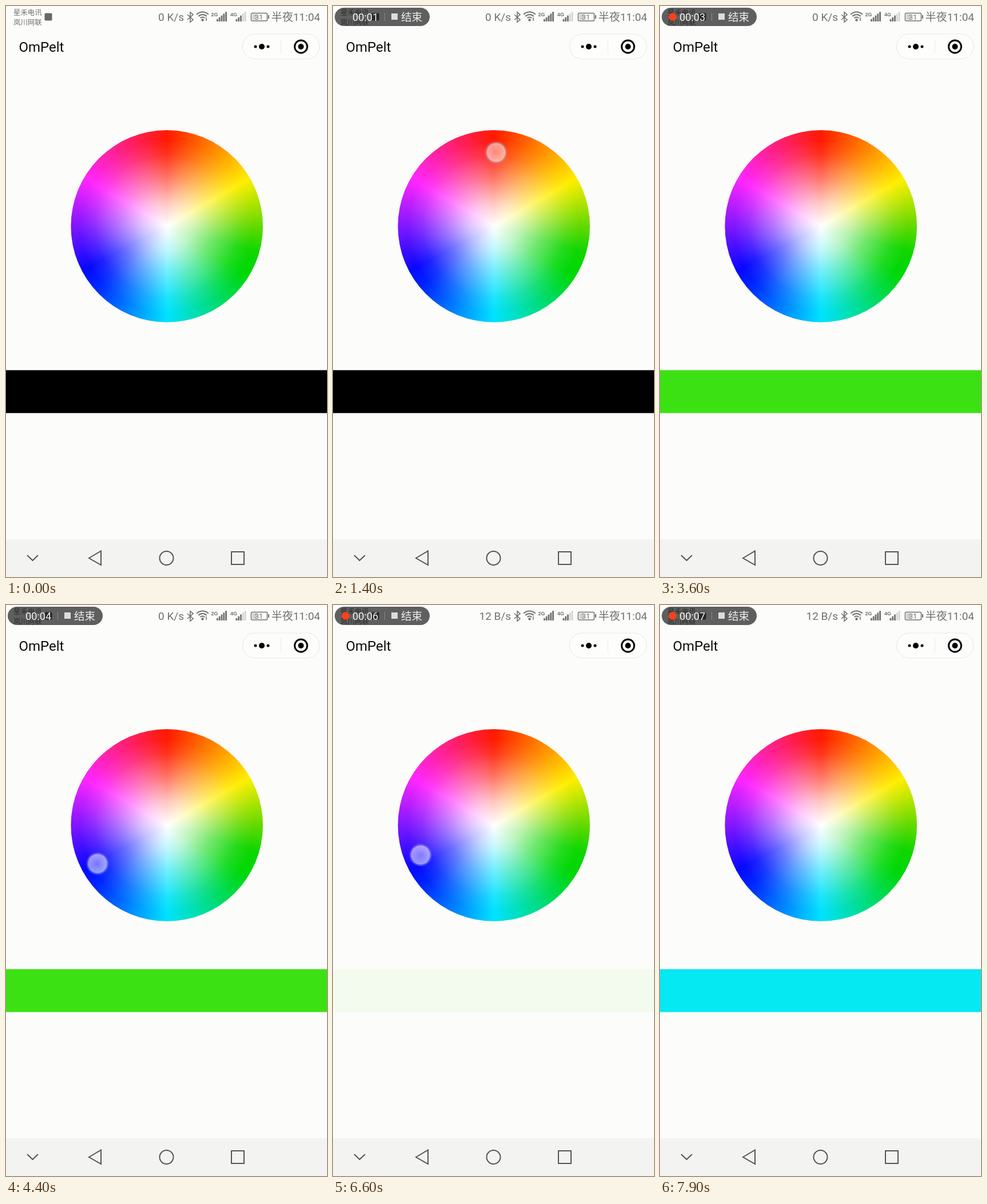
Recreate the animation shown at these times as an HTML page with a canvas. Size 561 px wide and 998 px high, loop 8 s.

```html
<!DOCTYPE html>
<html lang="zh">
<head>
<meta charset="utf-8">
<title>Colour wheel</title>
<style>
  html, body { margin: 0; width: 100%; height: 100%; overflow: hidden; background: #fcfcfa; }
  canvas { display: block; width: 561px; height: 998px; }
</style>
</head>
<body>
<canvas id="stage" width="561" height="998"></canvas>
<script>
const ctx = document.getElementById('stage').getContext('2d');
const LOOP = 8000, STEP = 100, TAU = Math.PI * 2;
const LATIN = 'Roboto, "Noto Sans CJK SC", "Noto Sans CJK", sans-serif';
const CJK = '"Noto Sans CJK SC", "Noto Sans CJK", sans-serif';
const GREY = '#707070';
const WHEEL = { x: 281.2, y: 384.9, r: 167.8 };

// Rim colours by clockwise angle, and white strength by distance from the centre.
const HUES = [
  [0, '#ff1a00'], [60, '#ffee00'], [90, '#62d900'], [106, '#10d600'], [122, '#00d808'],
  [180, '#00e2ff'], [230, '#0024ff'], [242, '#0808ff'], [300, '#ff26ff'], [360, '#ff1a00']
];
const WHITE = [[0, 1], [0.25, 0.74], [0.5, 0.4], [0.75, 0.1], [0.9, 0]];

// Each tap: finger position, time down, time gone, time the bar takes its colour.
const TAPS = [
  { x: 285, y: 256, from: 1200, to: 1600, pick: 1500, color: '#ff5634' },
  { x: 414, y: 424, from: 2900, to: 3400, pick: 3300, color: '#3ce114' },
  { x: 160, y: 452, from: 4300, to: 4700, pick: 4600, color: '#2424ff' },
  { x: 286, y: 387, from: 5100, to: 5400, pick: 5200, color: '#f3fbee' },
  { x: 153, y: 437, from: 6500, to: 7000, pick: 6900, color: '#3222ff' },
  { x: 283, y: 528, from: 7500, to: 7900, pick: 7800, color: '#04e9f2' }
];

function text(str, x, y, size, color, family = LATIN, align = 'left', weight = 400) {
  ctx.font = `${weight} ${size}px ${family}`;
  ctx.textAlign = align;
  ctx.fillStyle = color;
  ctx.fillText(str, x, y);
}

function rect(x, y, w, h, color) {
  ctx.fillStyle = color;
  ctx.fillRect(x, y, w, h);
}

function disc(x, y, r, fill) {
  ctx.beginPath();
  ctx.arc(x, y, r, 0, TAU);
  ctx.fillStyle = fill;
  ctx.fill();
}

function ring(x, y, r, width, color, a = 0, b = TAU) {
  ctx.beginPath();
  ctx.arc(x, y, r, a, b);
  stroke(width, color);
}

function stroke(width, color) {
  ctx.lineWidth = width;
  ctx.strokeStyle = color;
  ctx.stroke();
}

function line(points, width, color, closed = false) {
  ctx.beginPath();
  points.forEach(([x, y]) => ctx.lineTo(x, y));
  if (closed) ctx.closePath();
  stroke(width, color);
}

function roundBox(x, y, w, h, r) {
  ctx.beginPath();
  ctx.roundRect(x, y, w, h, r);
}

function signal(x, label, strong) {
  text(label, x, 18, 9, GREY, '"Liberation Sans", Arial, sans-serif', 'left', 700);
  for (let i = 0; i < 5; i++) {
    const h = 4 + i * 3.2;
    rect(x + 9.5 + i * 3.8, 27 - h, 2.8, h, i < strong ? GREY : '#d4d4d4');
  }
}

function drawStatus(t) {
  text('星禾电讯', 13, 16, 12.4, GREY, CJK);
  text('岚川网联', 13, 33, 12.4, GREY, CJK);
  roundBox(67.5, 12.5, 13, 13, 2);
  ctx.fillStyle = '#686868';
  ctx.fill();

  text(t < 5800 ? '0 K/s' : '12 B/s', 311, 26, 19, GREY, LATIN, 'right');
  line([[317, 15], [327, 24], [322, 28], [322, 11], [327, 15], [317, 24]], 1.6, GREY);

  for (const r of [5.5, 10, 14.5]) ring(343.5, 25, r, 2, GREY, -Math.PI * 0.75, -Math.PI * 0.25);
  disc(343.5, 24.5, 2.2, GREY);
  line([[350, 20], [350, 26]], 1.5, GREY);

  signal(358.5, '2G', 5);
  signal(392, '4G', 3);

  roundBox(428.5, 12.5, 28, 13.5, 2);
  stroke(1.5, GREY);
  rect(430.5, 14.5, 8, 9.5, '#d0d0d0');
  rect(458, 16, 2, 6, GREY);
  text('31', 442, 24, 13, GREY, LATIN, 'center');
  text('半夜11:04', 549, 26, 19, GREY, LATIN, 'right');
}

function dotAlpha(t) {
  const p = t % 1000;
  if (p >= 500) return p >= 600 ? 1 : 0.5;
  return t < 1000 ? 0 : Math.max(0, 0.6 - p / 250);
}

function drawRecorder(t) {
  if (t < 100) return;
  const alpha = t < 200 ? 0.5 : 1;
  ctx.globalAlpha = alpha;
  roundBox(3, 3, 166, 32, 16);
  ctx.fillStyle = 'rgba(0,0,0,.62)';
  ctx.fill();
  text('00:0' + Math.floor(t / 1000), 34, 26, 18.2, '#f4f4f4');
  rect(90, 12, 1, 14, '#8a8a8a');
  rect(102, 13, 11, 11, '#dcdcdc');
  text('结束', 119, 26, 18.5, '#f0f0f0', CJK);
  ctx.globalAlpha = alpha * dotAlpha(t);
  disc(22, 19, 6.7, '#ff3f18');
  ctx.globalAlpha = 1;
}

function drawHeader() {
  text('OmPelt', 22.5, 80, 24, '#0c0c0c');
  roundBox(413.5, 49, 134.5, 43.5, 21.75);
  ctx.fillStyle = '#fdfdfc';
  ctx.fill();
  stroke(1, '#e8e8e0');
  rect(480, 58, 1, 25, '#ececec');
  disc(436, 71, 2.5, '#000');
  disc(447, 71, 5, '#000');
  disc(458, 71, 2.5, '#000');
  ring(515.5, 71, 11, 3, '#000');
  disc(515.5, 71, 5, '#000');
}

function drawWheel() {
  const { x, y, r } = WHEEL;
  const hue = ctx.createConicGradient(-Math.PI / 2, x, y);
  HUES.forEach(([deg, color]) => hue.addColorStop(deg / 360, color));
  disc(x, y, r, hue);
  const fade = ctx.createRadialGradient(x, y, 0, x, y, r);
  WHITE.forEach(([at, alpha]) => fade.addColorStop(at, `rgba(255,255,255,${alpha})`));
  disc(x, y, r - 1, fade);
}

function drawTouch(t) {
  const tap = TAPS.find(p => t >= p.from && t < p.to);
  if (!tap) return;
  const { x, y } = tap;
  ctx.globalAlpha = t >= tap.to - STEP ? 0.5 : 1;
  const glow = ctx.createRadialGradient(x, y, 15.5, x, y, 20.5);
  glow.addColorStop(0, 'rgba(160,178,226,0)');
  glow.addColorStop(0.3, 'rgba(160,178,226,.5)');
  glow.addColorStop(1, 'rgba(160,178,226,0)');
  disc(x, y, 20.5, glow);
  const body = ctx.createRadialGradient(x, y, 0, x, y, 16.5);
  body.addColorStop(0, 'rgba(255,255,255,.42)');
  body.addColorStop(1, 'rgba(255,255,255,.58)');
  disc(x, y, 16.5, body);
  ctx.globalAlpha = 1;
}

function drawBar(t) {
  const color = TAPS.reduce((c, tap) => t >= tap.pick ? tap.color : c, '#000');
  rect(0, 636.5, 561, 75, color);
}

function drawNav() {
  const ink = '#555';
  rect(0, 932, 561, 66, '#f3f3f1');
  line([[37, 960], [46.5, 969], [56, 960]], 2, ink);
  line([[145, 965], [166, 952.5], [166, 977]], 2, ink, true);
  ring(280.5, 965, 12, 2, ink);
  line([[394, 954], [416, 954], [416, 976], [394, 976]], 2, ink, true);
}

function draw(now) {
  const t = Math.floor(now % LOOP / STEP) * STEP;
  rect(0, 0, 561, 998, '#fcfcfa');
  drawStatus(t);
  drawRecorder(t);
  drawHeader();
  drawWheel();
  drawTouch(t);
  drawBar(t);
  drawNav();
}

const start = performance.now();
function tick() {
  draw(performance.now() - start);
  requestAnimationFrame(tick);
}
tick();
</script>
</body>
</html>
```
